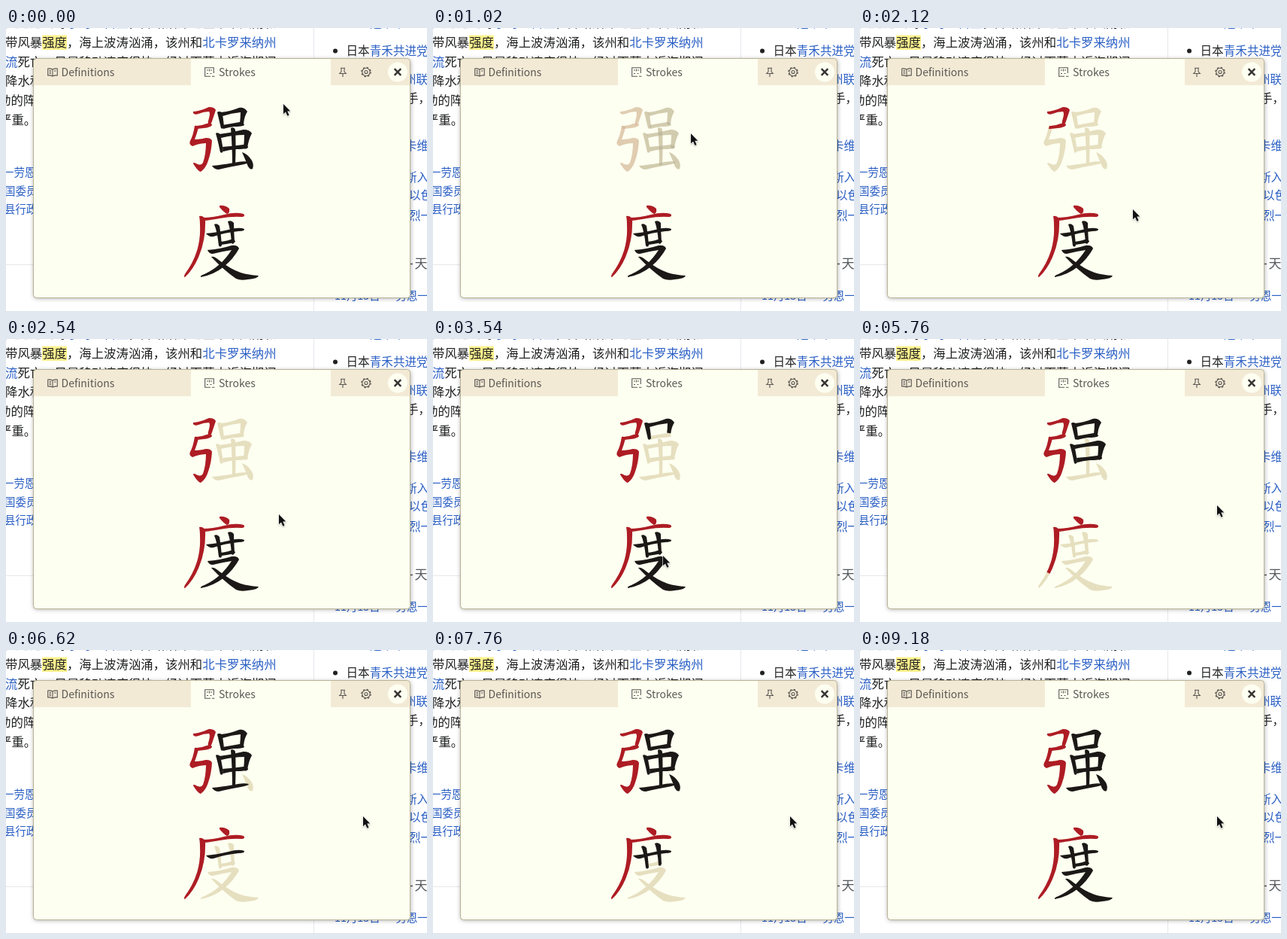
Write an HTML page that moves like this. It is 560 by 376 pixels and loops after 9.72 s.

```html
<!DOCTYPE html>
<html lang="zh-CN">
<head>
<meta charset="utf-8">
<title>Stroke order popup</title>
<style>
html, body { margin: 0; width: 100%; height: 100%; overflow: hidden; background: #fff; }
svg { display: block; }
text { font-family: "Noto Sans CJK SC", "Noto Sans CJK", "Noto Sans CJK JP", sans-serif; fill: #202122; white-space: pre; }
.body { font-size: 16.4px; }
.side { font-size: 15.6px; }
.small { font-size: 14.4px; }
.link { fill: #2a5fc4; }
.tab { font-size: 14px; fill: #5a5853; }
.icon { fill: none; stroke: #5a5853; stroke-width: 1.1; }
.brush { fill: none; stroke-width: 18; stroke-linejoin: round; stroke-dasharray: 1 2; }
</style>
</head>
<body>
<svg width="560" height="376" viewBox="0 0 560 376">
  <defs><clipPath id="frame"><rect x="37" y="41" width="501" height="317" rx="4"/></clipPath></defs>

  <g id="page">
    <path d="M409.5 0V376M0 314.5H409" stroke="#e6e8ec" fill="none"/>
    <rect x="48" y="9.5" width="33" height="19.5" fill="#fcf18d"/>
    <g class="body">
      <text x="-1" y="-1">风速达到每<tspan class="link">小时一百里</tspan>，并给沿岸地区带来大雨和</text>
      <text x="-1" y="25">带风暴强度，海上波涛汹涌，该州和<tspan class="link">北卡罗来纳州</tspan></text>
      <text x="-1" y="51"><tspan class="link">流</tspan>死亡。风暴移动速度很快，经过百慕大近海期间</text>
      <text x="-1" y="76">降水和</text>
      <text x="-10" y="102">动的阵</text>
      <text x="-9" y="128">严重。</text>
    </g>
    <g class="small">
      <text class="link" x="-4" y="197">一劳恩</text>
      <text class="link" x="-2" y="222">国委员</text>
      <text class="link" x="-2" y="246">县行政</text>
    </g>
    <circle cx="438" cy="30.5" r="3" fill="#202122"/>
    <g class="side">
      <text class="link" x="484" y="-1">选举中</text>
      <text x="452.5" y="36">日本<tspan class="link">青禾共进党</tspan></text>
      <text class="link" x="530" y="74">州联</text>
      <text x="533" y="99">手，</text>
      <text class="link" x="531" y="162">卡维</text>
      <text class="link" x="531" y="204">斯入</text>
      <text class="link" x="536" y="228">以色</text>
      <text class="link" x="536" y="255">烈一</text>
    </g>
    <path d="M537 313.5H541" stroke="#54595d" stroke-width="1.5"/>
    <text x="543.5" y="319" font-size="17" style="fill:#54595d">天</text>
    <text class="small link" x="437" y="361">11月15日 — 劳恩一</text>
  </g>

  <g id="popup">
    <rect x="37" y="41" width="501" height="317" rx="4" fill="#fdfff1" style="filter:drop-shadow(0 1px 3px rgba(0,0,0,.35))"/>
    <g clip-path="url(#frame)" fill="#f3ead6">
      <rect x="37" y="41" width="209" height="35"/>
      <rect x="432" y="41" width="106" height="35"/>
    </g>
    <rect x="36.5" y="40.5" width="501" height="318" rx="4" fill="none" stroke="#b9b496"/>

    <path class="icon" d="M62 55Q59 53.5 55.7 54V63Q59 62.6 62 64Q65 62.6 68.3 63V54Q65 53.5 62 55V64M57.5 56.5H60M57.5 58.5H60M57.5 60.5H60M64 57H66.5"/>
    <text class="tab" x="73.5" y="64">Definitions</text>
    <path class="icon" d="M272 64.3H264.7V52.7H276.3V60M267 56H269M272 56H274M270.5 54.5V57.5M267 60.5H269M271.5 60.5H273.5M274 64.3H277.5"/>
    <text class="tab" x="283" y="64">Strokes</text>

    <path class="icon" d="M445 53.2H451M446 53.5V58L443.7 60.5H452.3L450 58V53.5M448 60.5V65"/>
    <circle class="icon" cx="479" cy="58.5" r="5.2"/>
    <circle class="icon" cx="479" cy="58.5" r="6.2" style="stroke-width:1.3;stroke-dasharray:2.4 2.469"/>
    <circle class="icon" cx="479" cy="58.5" r="2"/>
    <circle cx="521" cy="58.5" r="13" fill="#fdfff1"/>
    <path d="M516.7 54.2L525.3 62.8M525.3 54.2L516.7 62.8" stroke="#353330" stroke-width="2.4"/>
  </g>

  <g id="glyphs"></g>

  <path id="cursor" d="M0 0V13.3L3 10.5L5.4 15.8L7.6 14.8L5.3 9.6H9.3Z" fill="#111" stroke="#fff" stroke-width="1.2"
    paint-order="stroke" style="filter:drop-shadow(0 1px 1px rgba(0,0,0,.25))"/>
</svg>

<script>
const LOOP = 9720, FADE = 400;
const RED = '#ae1c24', BLACK = '#1b1817', PALE = '#e6dfbf';

// Stroke: [outline, brush path, start, end]
const glyphs = [
  { fadeAt: 700, radical: 3, strokes: [
    ['M249 111Q252 111 256 110Q264 108 270 105Q277 105 279 109Q277 115 274 124Q272 130 269 129Q268 126 270 120Q272 113 270 111Q263 111 256 114Q251 116 249 113Z', 'M247 113L275 108L269 132', 1110, 1520],
    ['M252 130Q260 130 267 127Q274 126 274 129Q272 132 263 133Q256 134 251 134Z', 'M249 132L276 128', 1660, 1830],
    ['M251 130Q255 129 256 132Q254 140 251 148Q260 148 266 146Q273 146 274 150Q273 165 269 176Q266 186 259 191Q255 190 249 180Q249 178 253 180Q259 184 262 179Q266 168 266 153Q257 153 248 157Q243 155 245 150Q249 143 251 130Z', 'M254 127L248 153L270 150L267 174L259 187L247 178', 2100, 2550],
    ['M281 112Q283 110 287 112Q289 118 290 132Q288 135 286 133Q283 120 281 112Z', 'M283 109L288 137', 2790, 2960],
    ['M286 112Q298 111 310 106Q317 105 321 111Q317 117 316 127Q313 130 311 127Q312 118 312 112Q300 113 288 117Z', 'M284 115L317 109L313 131', 3250, 3620],
    ['M288 129Q300 127 311 125Q316 125 317 129Q314 131 303 131Q296 132 289 134Z', 'M286 132L319 127', 3830, 4000],
    ['M279 140Q281 138 285 141Q287 150 289 163Q288 167 285 165Q282 150 279 140Z', 'M281 136L288 169', 4270, 4440],
    ['M284 141Q300 139 316 135Q324 135 327 140Q323 147 321 159Q319 162 316 159Q317 150 317 142Q302 142 286 146Z', 'M282 144L322 138L318 163', 4730, 5090],
    ['M288 158Q302 157 316 155Q322 155 322 159Q318 161 306 161Q296 162 289 164Z', 'M286 161L324 157', 5350, 5520],
    ['M299 133Q303 131 305 135Q306 155 305 181Q303 184 301 182Q301 155 299 133Z', 'M302 130L303 186', 5780, 6070],
    ['M274 183Q286 182 303 179Q316 176 323 178Q323 180 312 182Q295 185 283 188Q277 188 274 183Z', 'M272 186L326 178', 6350, 6590],
    ['M314 165Q321 167 327 176Q330 182 328 187Q325 189 322 184Q318 174 314 165Z', 'M313 162L328 190', 6800, 6950]
  ]},
  { fadeAt: 3840, radical: 3, strokes: [
    ['M284 236Q291 235 297 240Q298 246 294 247Q291 246 284 238Z', 'M282 234L298 249', 4260, 4400],
    ['M262 252Q275 252 290 248Q305 244 316 247Q319 250 314 251Q300 250 284 253Q272 255 264 256Z', 'M259 254L319 248', 4740, 5030],
    ['M257 250Q262 249 265 254Q266 280 257 302Q250 320 238 331Q236 331 238 327Q249 312 254 296Q259 280 258 262Q258 254 257 250Z', 'M261 247Q264 282 254 305Q248 319 235 334', 5330, 6010],
    ['M266 273Q280 272 296 268Q310 264 317 267Q318 270 309 270Q290 272 276 277Q270 278 266 273Z', 'M263 276L320 267', 6230, 6470],
    ['M277 261Q281 259 284 263Q286 275 287 289Q285 292 283 289Q281 270 277 261Z', 'M280 258L286 293', 6760, 6940],
    ['M295 257Q300 255 303 259Q303 270 304 284Q303 288 300 286Q299 268 295 257Z', 'M299 254L302 290', 7250, 7450],
    ['M285 284Q294 283 299 281Q305 281 305 284Q302 286 286 288Z', 'M283 287L307 282', 7750, 7910],
    ['M268 295Q284 294 300 289Q308 288 310 293Q303 306 290 317Q276 328 259 331Q258 329 264 327Q286 317 300 295Q286 297 275 300Q270 300 268 295Z', 'M266 298L306 291Q295 316 256 332', 8110, 8570],
    ['M273 304Q277 303 284 309Q298 320 312 325Q322 328 336 329Q335 333 322 334Q312 336 306 333Q290 322 273 304Z', 'M271 301Q293 325 339 332', 8890, 9190]
  ]}
];

// Pointer path: [time, x, y]
const route = [
  [20, 369, 101], [540, 314, 148], [740, 314, 148], [1020, 343, 140],
  [1500, 363, 241], [2120, 363, 241], [2540, 363, 233], [2800, 363, 233],
  [3500, 306, 288], [3900, 306, 288], [4720, 382, 254], [4840, 384, 252], [5500, 475, 221]
];

const clamp = v => Math.max(0, Math.min(1, v));
const ease = v => (1 - Math.cos(Math.PI * clamp(v))) / 2;

function make(parent, tag, attrs) {
  const el = document.createElementNS('http://www.w3.org/2000/svg', tag);
  for (const key in attrs) el.setAttribute(key, attrs[key]);
  return parent.appendChild(el);
}

const layer = document.getElementById('glyphs');
const cursor = document.getElementById('cursor');
const parts = [];
glyphs.forEach(({ fadeAt, radical, strokes }, g) => {
  const base = make(layer, 'g', { fill: PALE });
  const ink = make(layer, 'g', {});
  strokes.forEach(([shape, median, start, end], i) => {
    const color = i < radical ? RED : BLACK, id = `clip${g}-${i}`;
    make(base, 'path', { d: shape });
    make(make(ink, 'clipPath', { id }), 'path', { d: shape });
    const solid = make(ink, 'path', { d: shape, fill: color });
    const holder = make(ink, 'g', { 'clip-path': `url(#${id})` });
    const brush = make(holder, 'path', { d: median, class: 'brush', stroke: color, pathLength: 1 });
    parts.push({ solid, brush, fadeAt, start, end });
  });
});

function pointerAt(t) {
  const next = route.findIndex(k => k[0] > t);
  if (next === 0) return route[0].slice(1);
  if (next < 0) return route[route.length - 1].slice(1);
  const [t0, x0, y0] = route[next - 1], [t1, x1, y1] = route[next];
  const p = (t - t0) / (t1 - t0);
  return [x0 + (x1 - x0) * p, y0 + (y1 - y0) * p];
}

function draw(now) {
  const t = now % LOOP;
  for (const { solid, brush, fadeAt, start, end } of parts) {
    const p = ease((t - start) / (end - start));
    const drawing = t > start && t < end;
    solid.style.opacity = t >= end ? 1 : 1 - ease((t - fadeAt) / FADE);
    brush.style.visibility = drawing ? 'visible' : 'hidden';
    brush.style.strokeDashoffset = 1 - p;
  }
  cursor.setAttribute('transform', `translate(${pointerAt(t)})`);
}

const begin = performance.now();
function tick() {
  draw(performance.now() - begin);
  requestAnimationFrame(tick);
}
tick();
</script>
</body>
</html>
```
